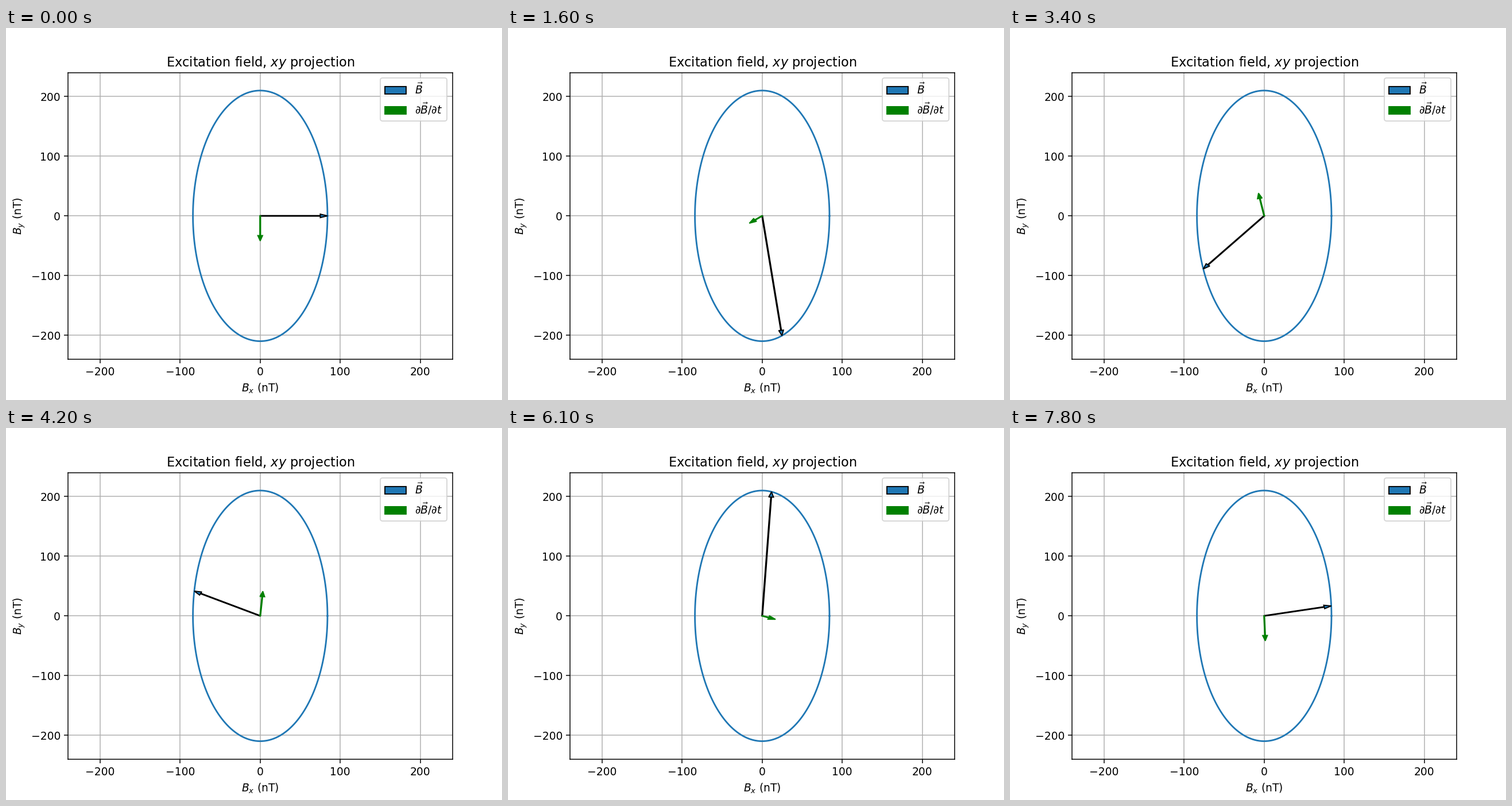
These frames come from a looping animation (864 by 648 pixels, 7900 ms). A matplotlib script:

```python
import numpy as np
import matplotlib.pyplot as plt
from matplotlib.animation import FuncAnimation

FRAMES, INTERVAL = 79, 100
AX, AY = 84, 210        # field amplitudes in nT
RATE_SCALE = 0.2        # display scale of the derivative arrow
LIMIT = 240


def field(phase):
    return AX * np.cos(phase), -AY * np.sin(phase)


def field_rate(phase):
    return (-RATE_SCALE * AX * np.sin(phase),
            -RATE_SCALE * AY * np.cos(phase))


def add_arrow(vec, label, **style):
    return ax.arrow(0, 0, *vec, width=1, head_width=6, head_length=9,
                    length_includes_head=True, label=label, zorder=3, **style)


fig, ax = plt.subplots(figsize=(6.4, 4.8), dpi=135)
ax.plot(*field(np.linspace(0, 2 * np.pi, 200)), color="C0")
b_arrow = add_arrow(field(0), r"$\vec{B}$", fc="C0", ec="black")
rate_arrow = add_arrow(field_rate(0), r"$\partial\vec{B}/\partial t$",
                       color="green")

ticks = np.arange(-200, 201, 100)
ax.set(xlim=(-LIMIT, LIMIT), ylim=(-LIMIT, LIMIT), xticks=ticks, yticks=ticks,
       xlabel="$B_x$ (nT)", ylabel="$B_y$ (nT)",
       title="Excitation field, $xy$ projection")
ax.grid(True)
ax.legend(loc="upper right")


def update(i):
    phase = 2 * np.pi * i / FRAMES
    for arrow, func in ((b_arrow, field), (rate_arrow, field_rate)):
        dx, dy = func(phase)
        arrow.set_data(dx=dx, dy=dy)
    return b_arrow, rate_arrow


anim = FuncAnimation(fig, update, frames=FRAMES, interval=INTERVAL,
                     repeat=True, repeat_delay=0, blit=False)
plt.show()
```
